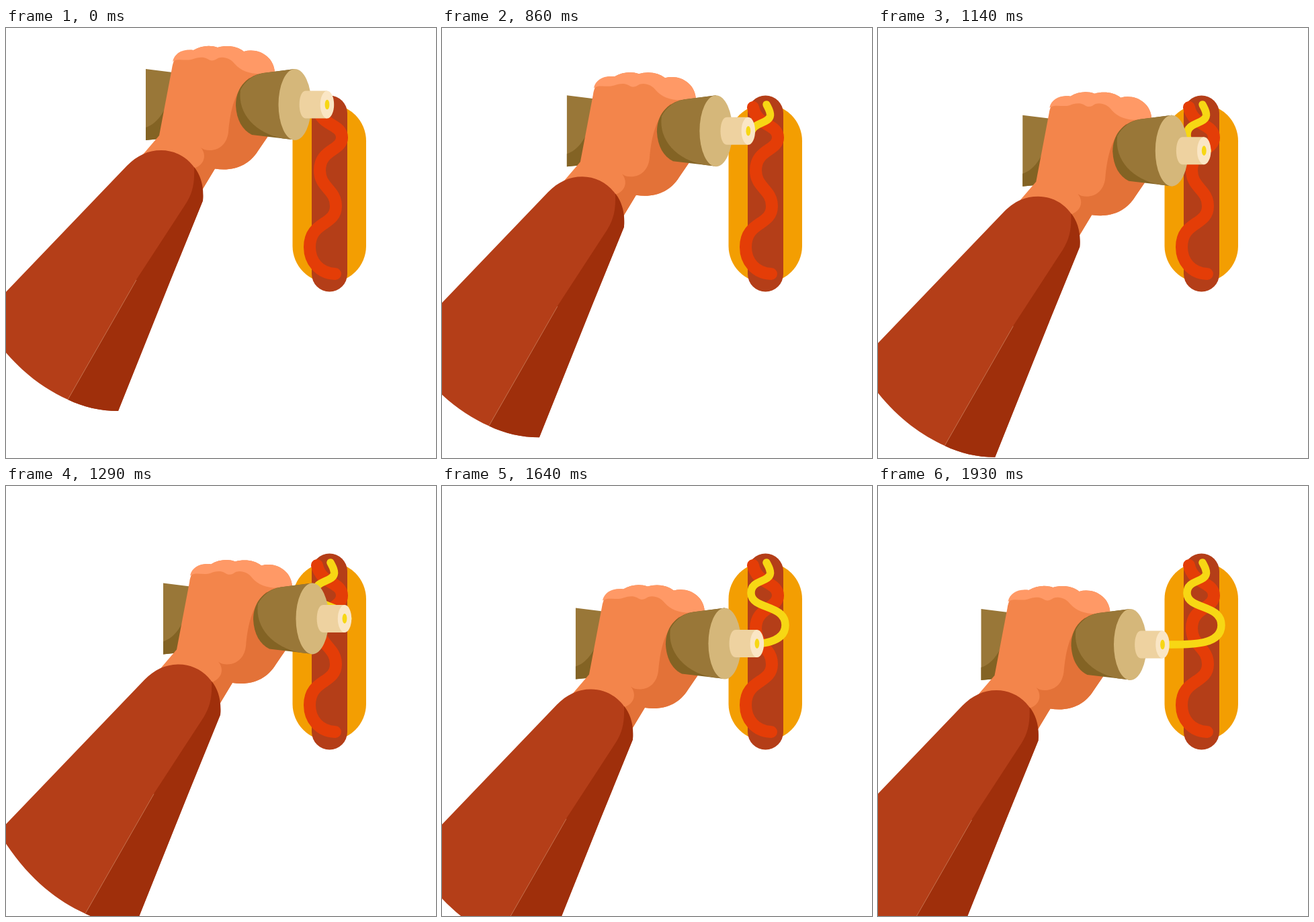
Write an HTML page that moves like this. It is 640x640 px and loops after 2710 ms.

```html
<!DOCTYPE html>
<html lang="en">
<head>
<meta charset="utf-8">
<title>Hot dog and mustard</title>
<style>
  /* Share of the mustard trail squeezed out, in percent */
  @property --drawn {
    syntax: "<number>";
    inherits: true;
    initial-value: -1;
  }

  html, body {
    margin: 0;
    width: 100%;
    height: 100%;
    overflow: hidden;
    background: #fff;
  }

  .stage {
    position: relative;
    width: 640px;
    height: 640px;
    overflow: hidden;
    --trail: path("M483 114 C486 120 489 124 488.5 130 C487 144 459 139 460 160 C461 184 511 176 511 207 C511 238 463 236 428.5 236");
    animation: squeeze 2710ms -4ms infinite;
  }

  svg {
    position: absolute;
    left: 0;
    top: 0;
    width: 640px;
    height: 640px;
    overflow: visible;
  }

  .mustard {
    d: var(--trail);
    fill: none;
    stroke: #f7d714;
    stroke-width: 11.5;
    stroke-linecap: round;
    stroke-dasharray: 100 200;
    stroke-dashoffset: calc(100px - var(--drawn) * 1px);
  }

  .arm {
    transform-origin: 0 0;
    offset-path: var(--trail);
    offset-anchor: 0 0;
    offset-rotate: 0deg;
    offset-distance: calc(var(--drawn) * 1%);
  }

  /* 38 ticks per loop: rest until tick 8, squeeze until tick 27 */
  @keyframes squeeze {
    0%       { --drawn: -1;    animation-timing-function: steps(1, end); }
    21.0526% { --drawn: 2.9;   animation-timing-function: steps(4, end); }
    31.5789% { --drawn: 23.55; animation-timing-function: steps(4, end); }
    42.1053% { --drawn: 43.7;  animation-timing-function: steps(5, end); }
    55.2632% { --drawn: 70;    animation-timing-function: steps(4, end); }
    65.7895% { --drawn: 90.95; animation-timing-function: steps(2, end); }
    71.0526%, 100% { --drawn: 100; }
  }
</style>
</head>
<body>
<div class="stage">
  <svg viewBox="0 0 640 640">
    <rect x="426.5" y="113.5" width="109.5" height="265.5" rx="54.75" fill="#f39e02"/>
    <rect x="455" y="100.5" width="53" height="292" rx="26.5" fill="#b43e18"/>
    <path fill="none" stroke="#e43d07" stroke-width="18" stroke-linecap="round"
      d="M463 118 C469 147 500 142 500 163 C500 183 467 180 467 212 C467 238 491 240 491 265 C491 295 452 287 452 326 C452 347 466 365 490 366"/>
    <path class="mustard" pathLength="100"/>
  </svg>

  <!-- The view starts where the trail starts, so the arm rides along it -->
  <svg class="arm" viewBox="483 114 640 640">
    <g id="bottle-end">
      <path fill="#997738" d="M208 61 L260 67.5 L250 163 L208 167Z"/>
      <path fill="#836324" d="M208 148 C224 143 237 126 247 95 L250 163 L208 167Z"/>
    </g>

    <g id="hand">
      <path fill="#f3854b" d="M190 204 L204 188 L228 160 L247 60 C250 40 262 31 279 33 C291 26 304 25 315 29 C329 25 344 27 354 35 C376 29 399 43 400 66 L389 162 L375 183 C362 204 339 214 311 209.5 L292 241 L270 275Z"/>
      <path fill="#e37238" d="M362 74 C341 94 334 120 331 155 C329 172 318 182 303 182 C298 182 294 181 290 178 C298 187 297 202 282 208 L270 215 L280 260 L292 241 L311 209.5 C339 214 362 204 375 183 L389.500 162 L395 90Z"/>
      <path fill="#ff9966" d="M248 50 C251 37 263 31 279 33 C291 26 304 25 315 29 C329 25 344 27 354 35 C376 29 399 43 400 66 L383 68 C363 69 350 64 341 54 C333 43 319 41 312 47 C308 49 304 49 300 46 C293 42 284 44 279 46 C268 50 257 44 248 50Z"/>
    </g>

    <g id="bottle">
      <path fill="#836324" d="M430 61 L383 67 C355 72 342 92 342 115 C343 137 352 152 366 159 L430 166.500Z"/>
      <path fill="#997738" d="M430 61 L383 67 C367 70 356 79 349 92 C344 128 372 157 412 164.500 L430 166.500Z"/>
      <ellipse cx="430" cy="114" rx="24.5" ry="53" fill="#d5b77a"/>
      <path fill="#eed2a0" d="M478 93.500 H446 C433.500 93.500 433.500 134.500 446 134.500 H478Z"/>
      <ellipse cx="478" cy="114" rx="10.2" ry="20.5" fill="#fae6c5"/>
      <ellipse cx="478" cy="114" rx="3.4" ry="7.3" fill="#f7d714"/>
    </g>

    <g id="sleeve">
      <path fill="#b43e18" d="M180 205 C195 190 211 182 231 182 C266 182 296 212 293 257 L245 375 L167 570 C140 570 115 564 92 553 C50 534 8 502 -30 443 L-30 424Z"/>
      <path fill="#9f2f0b" d="M280 207 C281 230 278 245 268 261 L195 373 L92 553 C115 564 140 570 167 570 L245 375 L293 257 C295 237 290 219 280 207Z"/>
      <path fill="none" stroke="#d28a68" stroke-width=".7" d="M194 375 L92 553"/>
    </g>
  </svg>
</div>
</body>
</html>
```
